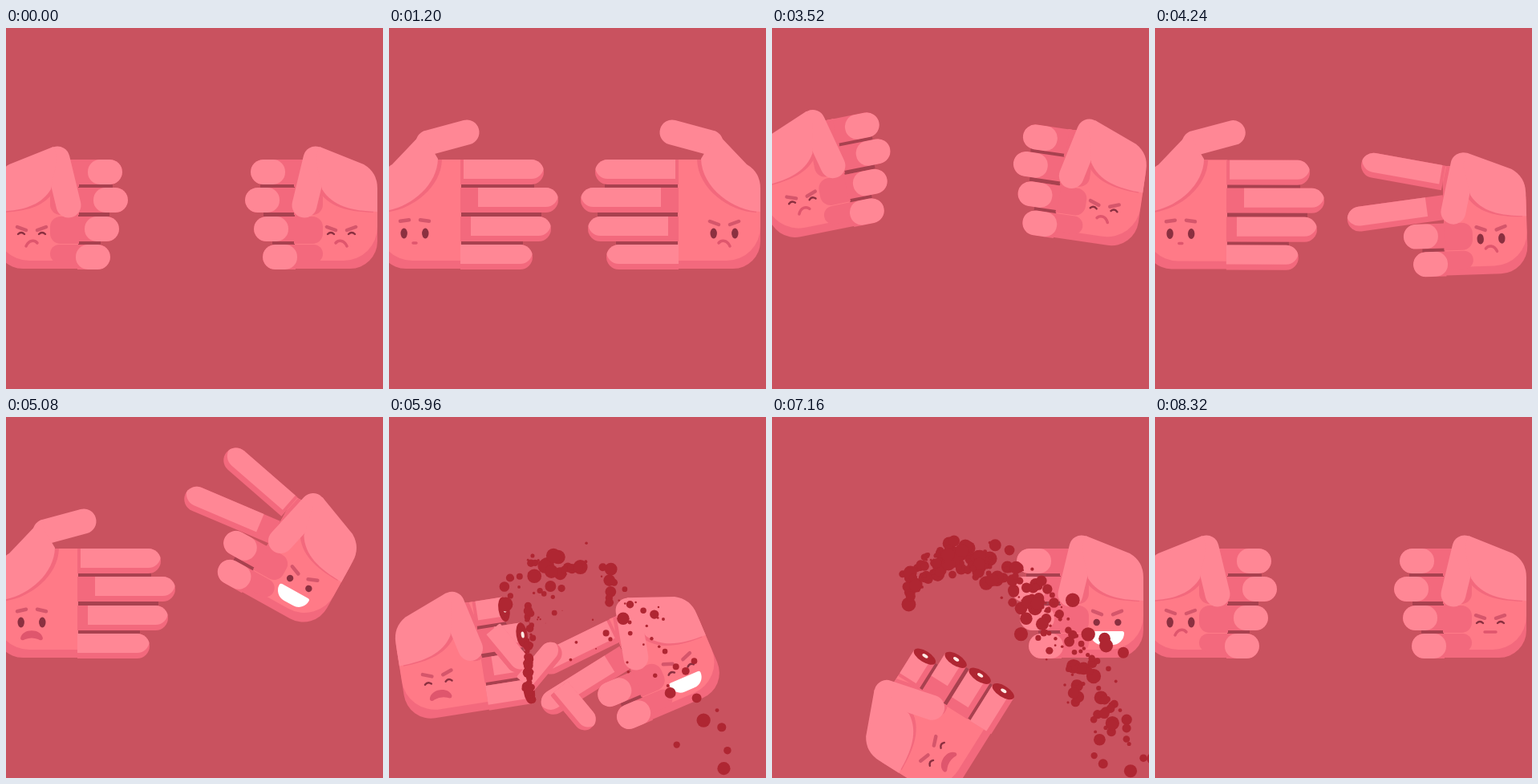
Recreate the animation shown at these times as an HTML page with a canvas. Size 470 by 450 pixels, loop 8.36 s.

```html
<!DOCTYPE html>
<html lang="en">
<head>
<meta charset="utf-8">
<title>Rock paper scissors</title>
<style>
  html, body { margin: 0; width: 100%; height: 100%; overflow: hidden; background: #c9525f; }
  canvas { display: block; }
</style>
</head>
<body>
<canvas id="stage" width="470" height="450"></canvas>
<script>
const ctx = document.getElementById('stage').getContext('2d');
const LOOP = 8360, ROUND2 = 1480, ROUND3 = 3120, REVEAL = 860, CUT = 5640, REGROW = 7560;
const C = {
  bg: '#c9525f', gap: '#a8414f', light: '#ff8795', palm: '#ff7a87', shade: '#f3697d',
  brow: '#d5566b', eye: '#8b3040', mouth: '#df566d', blood: '#af2632', bone: '#ffe9e4'
};

const lerp = (a, b, k) => a + (b - a) * k;
const mix = (a, b, k) => a.map((v, i) => lerp(v, b[i], k));
const clamp = v => Math.max(0, Math.min(1, v));
const smooth = v => v * v * (3 - 2 * v);
const ramp = (t, start, length) => smooth(clamp((t - start) / length));

function random(seed) {
  return () => {
    seed = (seed * 1664525 + 1013904223) >>> 0;
    return seed / 4294967296;
  };
}

function fillRound(x, y, w, h, r, color) {
  ctx.fillStyle = color;
  ctx.beginPath();
  ctx.roundRect(x, y, Math.max(0, w), h, r);
  ctx.fill();
}

function fillEllipse(x, y, rx, ry, color) {
  ctx.fillStyle = color;
  ctx.beginPath();
  ctx.ellipse(x, y, rx, ry, 0, 0, Math.PI * 2);
  ctx.fill();
}

function rotateAbout(x, y, degrees, dx = 0, dy = 0) {
  ctx.translate(x + dx, y + dy);
  ctx.rotate(degrees * Math.PI / 180);
  ctx.translate(-x, -y);
}

// Hands are drawn as the right one; the left one is mirrored.
const CURLED = [305, 298, 309, 320], LONG = [257, 239, 248, 271];
const FINGER_H = 31, PALM_X = 360;
const fingerY = i => Math.round(164 + 35.4 * i);
const stubX = i => CURLED[i] + 18 - 10 * i;

function drawFinger(i, ext, angle, severed) {
  const tip = lerp(CURLED[i], LONG[i], ext), y = fingerY(i);
  const r = FINGER_H / 2, mid = y + r, x = stubX(i);
  ctx.save();
  rotateAbout(366, mid, angle);
  ctx.save();
  if (severed) {
    ctx.beginPath();
    ctx.rect(x, y - 2, 100, FINGER_H + 4);
    ctx.clip();
  }
  fillRound(tip, y, PALM_X + 1 - tip, FINGER_H, [r, 0, 0, r], C.shade);
  ctx.beginPath();
  ctx.roundRect(tip, y, 100, FINGER_H, [r, 0, 0, r]);
  ctx.clip();
  const inner = 15 * (1 - ext);
  const end = lerp(tip + 43, PALM_X + 1, ext);
  fillRound(tip, y - 7 * ext, end - tip, FINGER_H, [r, inner, inner, r], C.light);
  ctx.restore();
  if (severed) {
    fillEllipse(x, mid, 7, r, C.blood);
    fillEllipse(x - 1, mid, 2, 4, C.bone);
  }
  ctx.restore();
}

function drawThumb(open, color) {
  const [tipX, tipY, x, y] = mix([372, 221, 386, 163], [353, 130, 401, 143], open);
  ctx.fillStyle = ctx.strokeStyle = color;
  ctx.lineWidth = 31;
  ctx.lineCap = 'round';
  ctx.beginPath();
  ctx.moveTo(tipX, tipY);
  ctx.lineTo(x, y);
  ctx.stroke();
  ctx.beginPath();
  ctx.moveTo(x + 5, y - 15);
  ctx.lineTo(446, 170);
  ctx.quadraticCurveTo(463, 180, 463, 200);
  ctx.lineTo(463, 229);
  ctx.bezierCurveTo(430, 228, lerp(407, 390, open), lerp(222, 200, open),
    lerp(394, 389, open), lerp(201, 163, open));
  ctx.lineTo(x, y);
  ctx.fill();
}

function drawPalm(exts, thumb) {
  ctx.save();
  ctx.beginPath();
  ctx.roundRect(PALM_X, 164, 103, 136, [0, 45, 34, 0]);
  ctx.fillStyle = C.shade;
  ctx.fill();
  ctx.clip();
  fillRound(350, 150, 113, 140, [0, 0, 42, 0], C.palm);
  ctx.translate(-5, 1);
  drawThumb(thumb, C.shade);
  ctx.restore();
  exts.forEach((ext, i) => {
    const w = 36 * (1 - ext);
    if (w > 2) fillRound(PALM_X - 1, fingerY(i), w, i < 3 ? 34 : 23, [0, 13, 13, 0], C.shade);
  });
}

// Mood: eye opening, brow slant, brow height, mouth.
const MOODS = {
  squint: [0, 2, -6, 'frown'],
  grumpy: [0, 1.8, -7, 'flat'],
  angry: [1, 2, -13, 'frown'],
  calm: [1, -0.8, -16, 'dot'],
  sad: [1, -1.2, -15, 'dome'],
  hurt: [0, 2, -10, 'dome'],
  evil: [0.65, 2.2, -12, 'grin'],
  laugh: [0, 2, -12, 'grin']
};

function drawMouth(kind) {
  ctx.fillStyle = ctx.strokeStyle = kind === 'grin' ? '#fff' : C.mouth;
  ctx.lineWidth = 3.5;
  ctx.beginPath();
  if (kind === 'grin') {
    ctx.roundRect(-21, 11, 42, 17, [3, 3, 17, 17]);
    ctx.fill();
  } else if (kind === 'dome') {
    ctx.moveTo(-14, 20);
    ctx.bezierCurveTo(-12, 7, 12, 7, 14, 20);
    ctx.quadraticCurveTo(13, 24, 8, 21);
    ctx.quadraticCurveTo(0, 18, -8, 21);
    ctx.quadraticCurveTo(-13, 24, -14, 20);
    ctx.fill();
  } else {
    const half = kind === 'dot' ? 2 : 7, droop = kind === 'frown' ? 4 : 0;
    ctx.moveTo(-half, 12);
    ctx.bezierCurveTo(-half / 2, 12 - droop, half / 2, 12 - droop, half, 12 + droop);
    ctx.stroke();
  }
}

function drawFace([open, slant, browY], mouth) {
  ctx.save();
  ctx.translate(418, 256);
  ctx.lineCap = 'round';
  for (const s of [-1, 1]) {
    ctx.strokeStyle = C.brow;
    ctx.lineWidth = 4.5;
    ctx.beginPath();
    ctx.moveTo(s * 18, browY - slant);
    ctx.lineTo(s * 7, browY + slant);
    ctx.stroke();
    if (open > 0.25) {
      fillEllipse(s * 13.3, 0, 4.2, 6.5 * open, C.eye);
      continue;
    }
    ctx.strokeStyle = C.eye;
    ctx.lineWidth = 2.4;
    ctx.beginPath();
    ctx.moveTo(s * 17, 1);
    ctx.quadraticCurveTo(s * 13, -3, s * 9, 1);
    ctx.stroke();
  }
  drawMouth(mouth);
  ctx.restore();
}

const roundStart = t => t < ROUND2 ? 0 : t < ROUND3 ? ROUND2 : ROUND3;

// Two beats of shaking before each reveal, in degrees of swing.
function shake(phase) {
  const strength = ramp(phase, 0, 170) * (1 - ramp(phase, REVEAL, 280));
  return -11.3 * strength * Math.cos((phase - 170) / 460 * Math.PI * 2);
}

// Passes through poses, each given as start, length and x, y, angle.
const REST = [0, 0, 0];
const glide = (t, steps) => steps.reduce((pose, [at, length, target]) =>
  mix(pose, target, ramp(t, at, length)), REST);

const PATHS = {
  left: t => t > REGROW
    ? mix([190, -50, 10], REST, ramp(t, REGROW, 740))
    : glide(t, [[CUT, 320, [-25, 78, 9]], [5960, 1200, [-157, 197, 58]], [7160, 350, [-160, 460, 80]]]),
  right: t =>
    glide(t, [[4480, 380, [-40, -34, 29]], [5340, 300, [-68, 52, -23]], [6350, 600, REST]])
};

function handPose(side, t) {
  const delay = side === 'right' ? 55 : 0;
  const u = shake(t - roundStart(t) - delay);
  const [x, y, angle] = PATHS[side](t);
  return [x, y - 3.2 * u, angle + u];
}

function handShape(side, t) {
  const left = side === 'left';
  const tie = ramp(t, REVEAL, 140) * (1 - ramp(t, 1290, 150));
  const final = ramp(t, ROUND3 + REVEAL, 140) * (1 - ramp(t, left ? REGROW - 40 : 6450, left ? 40 : 250));
  const snip = ramp(t, CUT - 40, 100);
  return {
    exts: CURLED.map((_, i) => tie + (left || i < 2 ? final : 0)),
    angles: left ? [0, 0, 0, 0] : [lerp(12, -3, snip), lerp(-6, -9, snip), 0, 0].map(a => a * final),
    thumb: tie + (left ? final * (1 - ramp(t, CUT, 200)) : 0),
    severed: left && t >= CUT && t < REGROW
  };
}

function mood(side, t) {
  const left = side === 'left', start = roundStart(t);
  if (t >= REGROW + 300) return left ? 'angry' : 'grumpy';
  if (t >= CUT) return left ? 'hurt' : t < 6600 ? 'laugh' : 'evil';
  if (t >= 4540) return left ? 'sad' : 'evil';
  const closing = t < ROUND3 && roundStart(t + 170) !== start;
  if (t - start < REVEAL + 80 || closing) return 'squint';
  return left && start !== ROUND2 ? 'calm' : 'angry';
}

function drawHand(side, t) {
  const { exts, angles, thumb, severed } = handShape(side, t);
  const [x, y, angle] = handPose(side, t);
  ctx.save();
  if (side === 'left') {
    ctx.translate(450, 0);
    ctx.scale(-1, 1);
  }
  rotateAbout(440, 225, angle, x, y);
  const ends = exts.map((ext, i) => severed ? stubX(i) : lerp(CURLED[i], LONG[i], ext) + 12);
  for (let i = 0; i < 3; i++) {
    if (angles[i]) continue;
    const from = Math.max(ends[i], ends[i + 1]);
    fillRound(from, fingerY(i) + FINGER_H - 1, PALM_X + 1 - from, 6, 0, C.gap);
  }
  drawPalm(exts, thumb);
  exts.forEach((ext, i) => drawFinger(i, ext, angles[i], severed));
  drawThumb(thumb, C.light);
  const now = MOODS[mood(side, t)], before = MOODS[mood(side, Math.max(0, t - 60))];
  drawFace(mix(before.slice(0, 3), now.slice(0, 3), 0.6), now[3]);
  ctx.restore();
}

// Severed fingertips fan out, tumble and drop.
function drawTips(t) {
  const s = (t - CUT) / 320;
  if (s < 0 || s > 4) return;
  for (let i = 0; i < 3; i++) {
    const x = lerp(165, 148 + 42 * i, s);
    const y = lerp(fingerY(i) + 15, 290 + 18 * i * i, s) + 70 * (s * s - s);
    const spin = (i % 2 ? -50 : 50) * s;
    ctx.save();
    rotateAbout(x, y, spin);
    ctx.beginPath();
    ctx.roundRect(x - 32, y - 14, 64, 28, [2, 14, 14, 2]);
    ctx.clip();
    fillRound(x - 32, y - 14, 64, 28, 0, C.shade);
    fillRound(x - 32, y - 20, 64, 28, [0, 14, 14, 0], C.light);
    ctx.restore();
  }
}

// Drops hang along one arc that starts at the stubs and falls to the right.
const rand = random(7);
const spread = () => rand() + rand() - 1;
const spray = Array.from({ length: 270 }, () => {
  const s = Math.pow(rand(), 1.15), width = 8 + 55 * s;
  return {
    x: 143 + 280 * s + spread() * width,
    y: 172 + 400 * (s - 0.2) ** 2 + 50 * Math.max(0, 0.2 - s) * 5 * rand() + spread() * width,
    r: 1.2 + 8 * Math.pow(rand(), 1.3),
    from: CUT + 20 + rand() * 900,
    to: 7500 + rand() * 500
  };
});
const drips = Array.from({ length: 36 }, () => ({
  x: 174 + spread() * 6,
  y: 235 + rand() * 120,
  r: 2 + 5 * rand(),
  from: CUT + 20 + rand() * 80,
  to: 6200 + rand() * 300
}));

function drawBlood(t) {
  for (const d of [...drips, ...spray]) {
    const age = t - d.from;
    if (age < 0 || t > d.to) continue;
    const k = 1 - (1 - clamp(age / 260)) ** 3;
    const r = d.r * clamp(age / 90) * clamp((d.to - t) / 350);
    const drift = 25 * clamp((t - 5960) / 1200);
    fillEllipse(lerp(175, d.x, k) + drift, lerp(270, d.y, k), r, r, C.blood);
  }
}

function frame(now) {
  const t = now % LOOP;
  ctx.fillStyle = C.bg;
  ctx.fillRect(0, 0, 470, 450);
  drawHand('left', t);
  drawHand('right', t);
  drawTips(t);
  drawBlood(t);
  requestAnimationFrame(frame);
}
requestAnimationFrame(frame);
</script>
</body>
</html>
```
